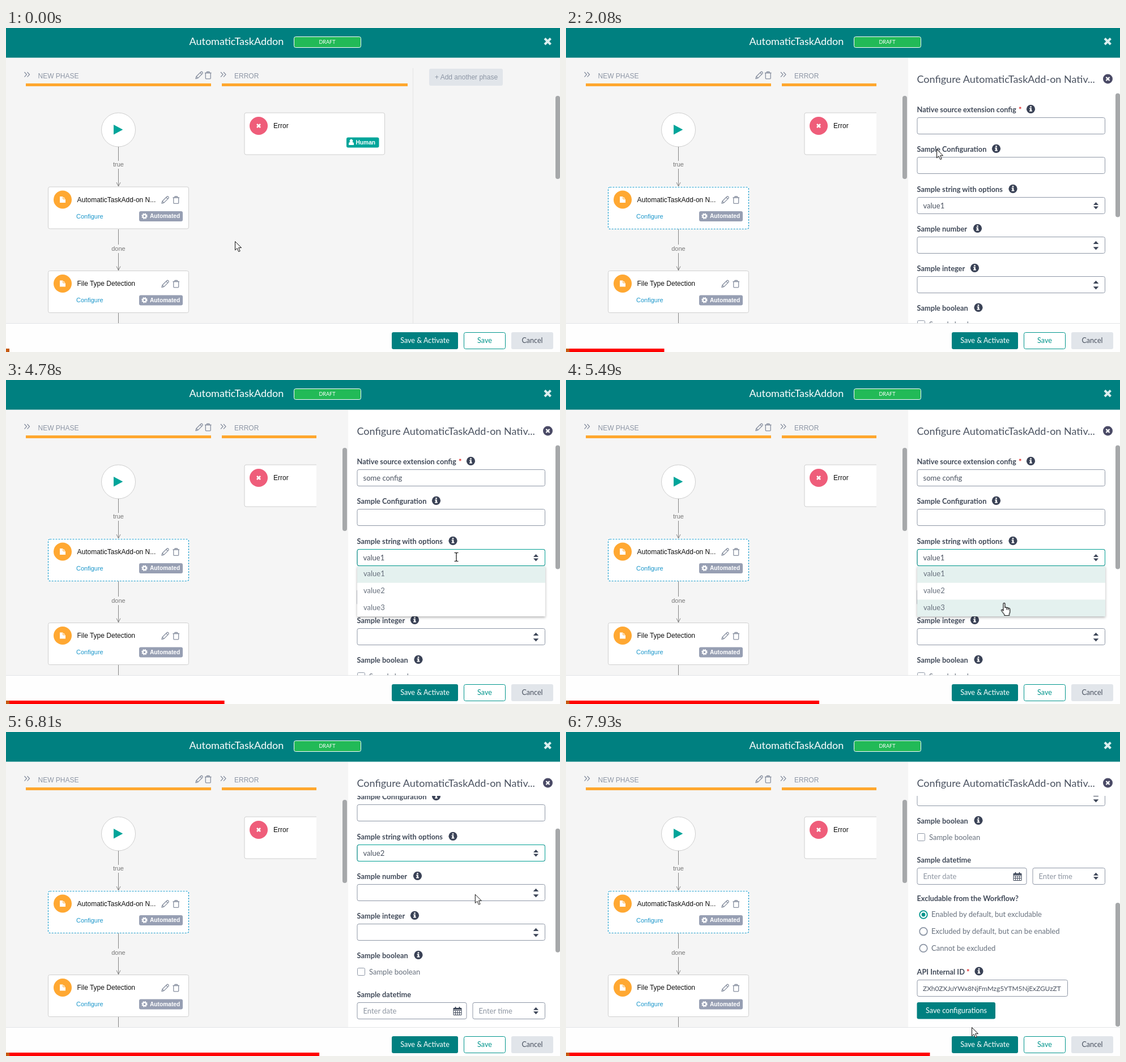
An HTML page that plays this animation: 978 px wide and 573 px high, repeating every 8 s.

```html
<!DOCTYPE html>
<html lang="en">
<head>
<meta charset="utf-8">
<title>Workflow designer</title>
<style>
@property --scroll { syntax: '<number>'; inherits: true; initial-value: 0; }
html, body { margin: 0; width: 100%; height: 100%; overflow: hidden; background: #f5f5f5; }
svg { display: block; }
text { font: 13px Lato, 'Open Sans', sans-serif; fill: #4a5260; white-space: pre; }
.ui text { font: 12px 'Liberation Sans', Arial, sans-serif; fill: #111; }
.ui .phase { fill: #8d96a5; }
.ui .edge { font-size: 11px; fill: #777; text-anchor: middle; }
.ui .link { font-size: 11px; fill: #1c97cb; }
.ui .badge { font-size: 10.2px; font-weight: 700; fill: #fff; }
.title { font-size: 18px; }
.label { font-size: 12.8px; font-weight: 700; fill: #414a59; }
.soft { fill: #68717e; }
.hint { fill: #8d95a1; }
.mid { text-anchor: middle; font-size: 12.6px; }
.tiny { text-anchor: middle; font-size: 9px; }
.token { font-size: 11.9px; }
.white { fill: #fff; }
.box { fill: #fff; stroke: #8e97a6; }
.focus { fill: none; stroke: #00a093; }
.card { fill: #fff; stroke: #cfcfcf; }
.icon { fill: none; stroke: #8890a0; stroke-width: 1.3; stroke-linejoin: round; }
.wire { fill: none; stroke: #858585; }
.caret { stroke: #222; }

/* Timeline: 1% is 80 ms */
.step { animation: 8s step-end infinite; }
#bar { animation: grow 8s steps(115) -18ms infinite; }
#pointer { animation: move 8s ease-in-out infinite; }
#arrow { animation-name: arrow; }
#hand { animation-name: hand; }
#beam { animation-name: beam; }
#dashes { animation-name: dashes; }
#panel { animation-name: panel; }
#scroller { animation: scroll 8s linear infinite; }
#fields { transform: translateY(calc(var(--scroll) * -1px)); }
#thumb { transform: translateY(calc(var(--scroll) * .552px)); }
#focusText { animation-name: focusText; }
#focusSelect { animation-name: focusSelect; }
#menu { animation-name: menu; }
#hover2 { animation-name: hover2; }
#hover3 { animation-name: hover3; }
#before { animation-name: before; }
#after { animation-name: after; }
#selectCaret { animation-name: selectCaret; }

@keyframes grow { from { transform: translateX(-642px); } to { transform: translateX(0); } }
@keyframes move {
  0%, 1.2% { transform: translate(404px, 377px); }
  7.4%, 8.8% { transform: translate(566px, 342px); }
  14.6%, 19.4% { transform: translate(125px, 338px); }
  29.4%, 53.1% { transform: translate(820.5px, 175px); }
  57.8%, 63.3% { transform: translate(795px, 313px); }
  68.4%, 70% { transform: translate(773.5px, 394px); }
  72.6%, 76.8% { transform: translate(782px, 368px); }
  81%, 82.8% { transform: translate(860px, 317px); }
  88.5%, 93.2% { transform: translate(767.5px, 230px); }
  98.8%, to { transform: translate(716px, 522px); }
}
@keyframes arrow { 0% { opacity: 1; } 14.1% { opacity: 0; } 20% { opacity: 1; } 27.2% { opacity: 0; } 82.8%, to { opacity: 1; } }
@keyframes hand { 0% { opacity: 0; } 14.1% { opacity: 1; } 20% { opacity: 0; } 64.4% { opacity: 1; } 75.6%, to { opacity: 0; } }
@keyframes beam { 0% { opacity: 0; } 27.2% { opacity: 1; } 64.4% { opacity: 0; } 75.6% { opacity: 1; } 82.8%, to { opacity: 0; } }
@keyframes dashes { 0% { opacity: 0; } 12.2%, to { opacity: 1; } }
@keyframes panel { 0% { visibility: hidden; } 18.5%, to { visibility: visible; } }
@keyframes scroll {
  0%, 80.6% { --scroll: 0; }
  81.5%, 82.4% { --scroll: 13; }
  83.4%, 85.6% { --scroll: 100; }
  87.9%, 90% { --scroll: 200; }
  92%, 93.1% { --scroll: 298; }
  93.4%, 94.7% { --scroll: 300; }
  96.5%, to { --scroll: 338; }
}
@keyframes focusText { 0% { opacity: 0; } 30.4% { opacity: 1; } 59.4%, to { opacity: 0; } }
@keyframes focusSelect { 0% { opacity: 0; } 59.4%, to { opacity: 1; } }
@keyframes menu { 0% { opacity: 0; } 59.4% { opacity: 1; } 75.6%, to { opacity: 0; } }
@keyframes hover2 { 0% { opacity: 0; } 66% { opacity: 1; } 67.2% { opacity: 0; } 71.2%, to { opacity: 1; } }
@keyframes hover3 { 0% { opacity: 0; } 67.2% { opacity: 1; } 71.2%, to { opacity: 0; } }
@keyframes before { 0% { opacity: 1; } 75.6%, to { opacity: 0; } }
@keyframes after { 0% { opacity: 0; } 75.6%, to { opacity: 1; } }
@keyframes selectCaret { 0% { opacity: 0; } 75.6% { opacity: 1; } 82.4%, to { opacity: 0; } }
</style>
</head>
<body>
<svg width="978" height="573" viewBox="0 0 978 573">
  <defs>
    <clipPath id="view"><rect x="604" y="113" width="374" height="409"/></clipPath>
    <clipPath id="tokenClip"><rect x="621" y="770" width="255" height="40"/></clipPath>
    <filter id="shadow" x="-5%" y="-5%" width="110%" height="120%">
      <feDropShadow dx="0" dy="2" stdDeviation="2" flood-opacity=".3"/>
    </filter>
    <path id="pencil" d="M1 13.2l1-4 8-8q1.3-1 2.6.2t.2 2.7l-8 8zM2 9.2l2.9 2.9M8.7 2.5l2.9 2.9"/>
    <path id="trash" d="M.5 3h11.5M4 3v-2h4.5v2M1.8 3v9.3q0 1 1 1h6.900q1 0 1-1v-9.3"/>
    <path id="chevrons" d="M0 0l4 4.3-4 4.3M5 0l4 4.3-4 4.3"/>
    <path id="cross" d="M-3-3l6 6M3-3l-6 6"/>
    <path id="head" d="M-3.5-7l3.5 7 3.5-7"/>
    <g id="info">
      <circle r="7.6" fill="#3a4256"/>
      <path fill="#fff" d="M-1.3-5h2.6v2.2h-2.6zM-2.3-1.7h3.6v4.2h1.1v1.7h-4.8v-1.7h1.2v-2.5h-1.1z"/>
    </g>
    <path id="sort" fill="#3d4658" d="M-4.5-1.3l4.5-5 4.5 5zM-4.5 1.3l4.5 5 4.5-5z"/>
    <path id="spin" fill="#3d4658" d="M-4.8-2.5l4.8-5.3 4.8 5.3zM-4.8 2.7l4.8 5.3 4.8-5.3z"/>
    <g id="task" class="ui">
      <rect class="card" x="74.5" y="281" width="248" height="74" rx="3"/>
      <circle cx="100" cy="303.5" r="16" fill="#ffa832"/>
      <path fill="#fff" d="M95 298h5.5l4.5 4.5v6.5h-10z"/>
      <path fill="none" stroke="#ffa832" d="M100.7 298v4.3h4.3"/>
      <g class="icon"><use href="#pencil" x="274" y="297"/><use href="#trash" x="294" y="297"/></g>
      <text class="link" x="124" y="336.5">Configure</text>
      <rect x="235" y="324" width="77" height="18" rx="3" fill="#979fb3"/>
      <g fill="none" stroke="#fff" transform="translate(244.5 332.7)">
        <circle r="2.900" stroke-width="2.2"/>
        <circle r="4.4" stroke-width="1.7" stroke-dasharray="1.9 1.556"/>
      </g>
      <text class="badge" x="254" y="336.3">Automated</text>
    </g>
  </defs>

  <rect width="978" height="573" fill="#f5f5f5"/>
  <g class="ui">
    <path d="M718.5 71v452" stroke="#e4e4e4"/>
    <g class="icon">
      <use href="#chevrons" x="32.5" y="78"/><use href="#chevrons" x="379" y="78"/>
      <use href="#pencil" x="334" y="76.5"/><use href="#trash" x="350.5" y="76.5"/>
    </g>
    <text class="phase" x="56.5" y="89">NEW PHASE</text>
    <text class="phase" x="403" y="89">ERROR</text>
    <path fill="#ffa72e" d="M35 98h327v5h-327zM381 98h328v5h-328z"/>
    <rect x="747" y="72" width="130" height="30" rx="3" fill="#e1e5ea"/>
    <text class="phase" x="757" y="91">+ Add another phase</text>
    <rect x="970" y="120" width="8" height="147" rx="4" fill="#a6a8aa"/>

    <circle class="card" cx="198.5" cy="180" r="30"/>
    <path d="M190 171l16.3 8.8-16.3 8.8z" fill="#00a59a"/>
    <g class="wire">
      <path d="M198.5 210v25M198.5 249v31M198.5 356v27M198.5 398v31M198.5 504v19"/>
      <use href="#head" x="198.5" y="280"/><use href="#head" x="198.5" y="428.5"/>
    </g>
    <text class="edge" x="198.5" y="245">true</text>
    <text class="edge" x="198.5" y="394">done</text>

    <use href="#task"/>
    <text x="125.5" y="308">AutomaticTaskAdd-on N...</text>
    <use href="#task" y="148.5"/>
    <text x="125.5" y="456.3">File Type Detection</text>
    <g id="dashes" class="step" fill="none">
      <rect x="74.5" y="281" width="248" height="74" rx="3" stroke="#fff" stroke-width="2"/>
      <rect x="74.5" y="281.5" width="248" height="74" rx="3" stroke="#1b9ccb" stroke-width="1.2" stroke-dasharray="3 2"/>
    </g>

    <rect class="card" x="421" y="150" width="247.5" height="74" rx="3"/>
    <circle cx="446" cy="173" r="16" fill="#ef5d7a"/>
    <use href="#cross" x="446" y="173" stroke="#fff" stroke-width="2.6"/>
    <text x="472" y="177">Error</text>
    <rect x="601" y="193.5" width="57.5" height="18" rx="3" fill="#00a59a"/>
    <path fill="#fff" d="M605 207v-2.5q0-2.5 2.7-2.8a2.8 2.8 0 1 1 3.6 0q2.7.3 2.7 2.8v2.5z"/>
    <text class="badge" x="617.5" y="206.3">Human</text>
  </g>

  <g id="panel" class="step">
    <rect x="548" y="53" width="56" height="470" fill="#f5f5f5"/>
    <rect x="594" y="120" width="8" height="147" rx="4" fill="#a6a8aa"/>
    <rect x="604" y="53" width="374" height="470" fill="#fff"/>
    <text class="title" x="619.5" y="97">Configure AutomaticTaskAdd-on Nativ...</text>
    <circle cx="956.5" cy="90" r="8.5" fill="#4a4a66"/>
    <use href="#cross" x="956.5" y="90" stroke="#fff" stroke-width="2.4"/>
    <g id="scroller">
      <g clip-path="url(#view)"><g id="fields"></g></g>
      <rect id="thumb" x="970" y="115.5" width="8" height="219" rx="4" fill="#a6a8aa"/>
    </g>
  </g>

  <rect width="978" height="52.5" fill="#008080"/>
  <text class="title white" x="323.5" y="30">AutomaticTaskAddon</text>
  <rect x="508.5" y="15.5" width="118" height="19" rx="3" fill="#22ba57" stroke="#fff"/>
  <text class="tiny white" x="567" y="28">DRAFT</text>
  <path d="M951 18.5l10.500 10.500M961.5 18.5l-10.500 10.500" stroke="#dcefef" stroke-width="4"/>

  <rect y="522.5" width="978" height="51" fill="#fefefe"/>
  <path d="M0 522.5h978" stroke="#e3e5e7"/>
  <rect x="681" y="538" width="117" height="30" rx="3" fill="#008080"/>
  <text class="mid white" x="739.5" y="557" font-weight="500">Save &amp; Activate</text>
  <rect x="808.5" y="538.5" width="73" height="29" rx="3" fill="#fff" stroke="#00958c"/>
  <text class="mid" x="845" y="557" style="fill:#00958c">Save</text>
  <rect x="892" y="538" width="74" height="30" rx="3" fill="#e1e5ea"/>
  <text class="mid" x="929" y="557">Cancel</text>

  <rect id="bar" y="567" width="648" height="6" fill="#f00"/>
  <rect y="567" width="6" height="6" fill="#c65a11"/>

  <g id="pointer" stroke-linejoin="round">
    <path id="arrow" class="step" fill="#fff" stroke="#111" d="M.5.5v15.3l3.5-3.3 2.7 6 2.5-1.1-2.6-5.8h4.9z"/>
    <path id="hand" class="step" fill="#fff" stroke="#111" stroke-width="1.2" d="M-1.5 1.5q1.5-2.2 3 0v7q1.3-1.3 3 .3 1.5-1 2.8.7 2-.6 2.7 1.3 1.2 5-1 9.2v2.5h-8.5v-1.5l-5.3-7q-.5-2.5 1.7-1.8l1.6 1.8zM4.5 9v3.5M7.3 9.8v3"/>
    <path id="beam" class="step" fill="none" stroke="#111" stroke-width="1.2" d="M-3.5-7.5h2.5l1 1 1-1h2.5M0-6.5v13M-3.5 7.5h2.5l1-1 1 1h2.5"/>
  </g>
</svg>
<script>
const row = i => Math.round(i * 70.25);
const idAttr = id => id ? ` id="${id}"` : '';
const text = (x, y, s, cls = '', id = '') =>
  `<text x="${x}" y="${y}" class="${cls}"${idAttr(id)}>${s}</text>`;
const rect = (x, y, w, cls = 'box', id = '') =>
  `<rect x="${x}" y="${y}" width="${w}" height="29" rx="3" class="${cls}"${idAttr(id)}/>`;
const use = (name, x, y) => `<use href="#${name}" x="${x}" y="${y}"/>`;
const star = (x, y) => `<text x="${x}" y="${y}" style="fill:#d22;font-weight:700">*</text>`;

const labels = [
  ['Native source extension config', 820.5], ['Sample Configuration', 759.5],
  ['Sample string with options', 789], ['Sample number', 726.5],
  ['Sample integer', 721.5], ['Sample boolean', 728]
];
const inputs = labels.map(([name, infoX], i) => {
  const y = row(i);
  return text(619.5, 149.3 + y, name, 'label') + use('info', infoX, 143.3 + y) +
    (i < 5 ? rect(620, 158.5 + y, 331.5) : '') +
    (i === 2 ? use('sort', 935.5, 173.2 + y) : '') +
    (i === 3 || i === 4 ? use('spin', 935.5, 173.5 + y) : '');
}).join('');

const calendar = `<g transform="translate(789.5 586)" fill="none" stroke="#3d4658">
  <path d="M.5 2.5h14v12h-14zM.5 6.5h14M.5 10.5h14M4 6.5v8M7.5 6.5v8M11 6.5v8"/>
  <path d="M.5 4h14M4 0v4M11 0v4" stroke-width="2"/></g>`;

const radios = ['Enabled by default, but excludable', 'Excluded by default, but can be enabled', 'Cannot be excluded']
  .map((s, i) => {
    const y = 661 + i * 29.7;
    const dot = i ? '' : `<circle cx="631" cy="${y}" r="3.4" fill="#00958c"/>`;
    return `<circle cx="631" cy="${y}" r="6.8" fill="#fff" stroke="${i ? '#8e97a6' : '#00958c'}" stroke-width="1.8"/>` +
      dot + text(645, y + 4.3, s, 'soft');
  }).join('');

const option = (i, attrs = '') =>
  `<rect x="620" y="${329 + i * 29.7}" width="332" height="29.7" fill="#e4f1ef" ${attrs}/>`;
const menu = `<g id="menu" class="step">
  <rect x="620" y="329" width="332" height="89" fill="#fff" filter="url(#shadow)"/>
  ${option(0)}${option(1, 'id="hover2" class="step"')}${option(2, 'id="hover3" class="step"')}
  ${[1, 2, 3].map(n => text(631, 317.5 + n * 29.7, 'value' + n, 'soft')).join('')}</g>`;

document.getElementById('fields').innerHTML = inputs +
  star(799, 149.3) +
  text(630.5, 178, '', '', 'typed') + '<path id="textCaret" class="caret" d="M.5 166v15"/>' +
  rect(620, 158.5, 331.5, 'focus step', 'focusText') +
  text(630.5, 318.5, 'value1', 'step', 'before') + text(630.5, 318.5, 'value2', 'step', 'after') +
  '<path id="selectCaret" class="caret step" d="M668.5 306v15"/>' +
  rect(620, 158.5 + row(2), 331.5, 'focus step', 'focusSelect') +
  '<rect x="620.5" y="517.5" width="13" height="13" rx="2" class="box"/>' +
  text(641, 528.5, 'Sample boolean', 'soft') +
  text(619.5, 569, 'Sample datetime', 'label') +
  rect(620, 578.5, 193) + rect(824, 578.5, 127.5) +
  text(630.5, 597.7, 'Enter date', 'hint') + text(834.5, 597.7, 'Enter time', 'hint') +
  calendar + use('sort', 935.5, 593) +
  text(619.5, 637, 'Excludable from the Workflow?', 'label') + radios +
  text(619.5, 766.7, 'API Internal ID', 'label') + star(707, 766.7) + use('info', 729, 761) +
  rect(620, 776.5, 265.5) +
  `<g clip-path="url(#tokenClip)">${text(630, 795.5, 'ZXh0ZXJuYWx8NjFmMzg5YTM5NjExZGUzZT', 'token')}</g>` +
  '<rect x="619.5" y="816" width="138.5" height="29.5" rx="3" fill="#008080"/>' +
  text(689, 834.7, 'Save configurations', 'mid white') + menu;

const typed = document.getElementById('typed');
const caret = document.getElementById('textCaret');
const phrase = 'some config';
const typeStart = 2560, keyGap = 105, focusAt = 2430, blurAt = 4750;
const start = performance.now();

function draw(now) {
  const t = Math.max(0, now - start) % 8000;
  const count = Math.min(phrase.length, Math.max(0, Math.floor((t - typeStart) / keyGap)));
  const content = phrase.slice(0, count);
  if (typed.textContent !== content) typed.textContent = content;
  const lastKey = count ? typeStart + count * keyGap : focusAt;
  const lit = t >= focusAt && t < blurAt && (t - lastKey) % 1060 < 530;
  caret.style.opacity = lit ? 1 : 0;
  const width = count ? typed.getComputedTextLength() : 0;
  caret.setAttribute('transform', `translate(${Math.round(630 + width)} 0)`);
  requestAnimationFrame(draw);
}
requestAnimationFrame(draw);
</script>
</body>
</html>
```
